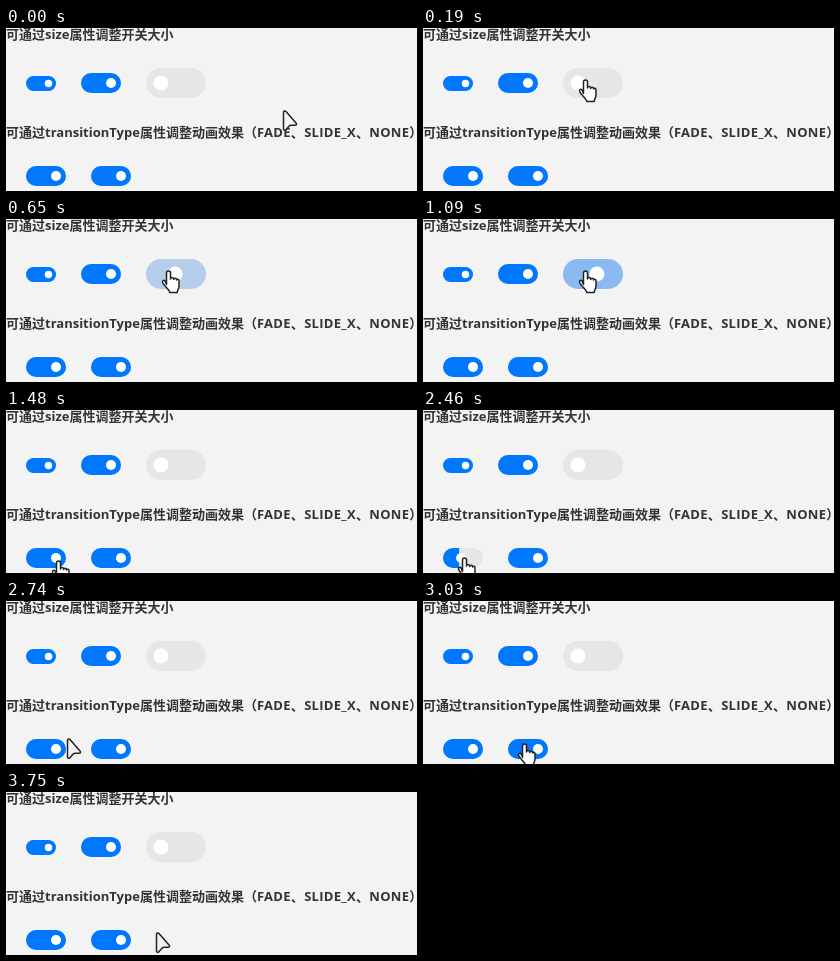
These frames come from a looping animation (411 px wide and 163 px high, 3790 ms). An HTML page:

```html
<!DOCTYPE html>
<html lang="zh">
<head>
<meta charset="utf-8">
<style>
html, body { margin: 0; width: 100%; height: 100%; overflow: hidden; background: #f3f3f3; }
svg { display: block; }
text { font: 700 13px "Open Sans", "Noto Sans CJK SC", "Noto Sans CJK", sans-serif; fill: #333; }
.caps { letter-spacing: .3px; }
#hand, #arrow { stroke: #222; stroke-width: 1.5; stroke-linejoin: round; fill: #fff; }
#arrow { fill: #f3f3f3; }
</style>
</head>
<body>
<svg width="411" height="163" viewBox="0 0 411 163">
  <text x="0" y="11">可通过size属性调整开关大小</text>
  <text x="0" y="109">可通过transitionType属性调整动画效果（<tspan class="caps">FADE、SLIDE_X、NONE</tspan>）</text>
  <g id="switches"></g>
  <path id="hand" d="M4.5 14.5V3a2 2 0 0 1 4 0V9c0-2 3.2-2 3.2.4c.2-1.6 2.9-1.4 2.9.6c.3-1.2 2.4-1 2.4.8V16c0 3-1.8 4-1.8 6.5H7.8c0-2-5-6-7-9.7c-1-2 1-3.2 2.3-1.8z"/>
  <path id="arrow" d="M1.5 2.5V19c0 1.5 1.5 1.8 2.4.7L7 16.2c.6-.7 1.3-1 2.2-1H13c1.6 0 2-1.2 1-2.2L4 1.5C3 .5 1.5 1 1.5 2.5z"/>
</svg>
<script>
const LOOP = 3790, BLUE = '#0077ff', GREY = '#e6e6e6';
const byId = id => document.getElementById(id);

function add(tag, attrs) {
  const el = document.createElementNS('http://www.w3.org/2000/svg', tag);
  for (const k in attrs) el.setAttribute(k, attrs[k]);
  return byId('switches').appendChild(el);
}

// mode: how the blue layer follows the knob
function makeSwitch(x, y, w, h, mode) {
  const box = { x, y, width: w, height: h, rx: h / 2 };
  add('rect', { ...box, fill: GREY });
  const blue = add('rect', { ...box, fill: BLUE });
  const knob = add('circle', { cy: y + h / 2, r: h / 4, fill: '#fff' });
  return p => {
    knob.setAttribute('cx', x + h / 2 + p * (w - h));
    if (mode === 'slide') blue.style.clipPath = `inset(0 ${(1 - p) * w}px 0 0)`;
    else blue.style.opacity = p * p;
  };
}

makeSwitch(20, 48, 30, 15)(1);
makeSwitch(75, 45, 40, 20)(1);
const large = makeSwitch(140, 40, 60, 30, 'fade');
const slide = makeSwitch(20, 138, 40, 20, 'slide');
const instant = makeSwitch(85, 138, 40, 20, 'fade');

// time, x, y, shape
const moves = [
  [0, 276, 82, 'arrow'], [50, 262, 80, 'arrow'], [100, 222, 67, 'arrow'],
  [140, 175, 53, 'hand'], [190, 156, 51, 'hand'],
  [1330, 130, 72, 'arrow'], [1380, 78, 120, 'arrow'], [1430, 48, 153, 'hand'],
  [1480, 46, 150, 'hand'], [1530, 41, 145, 'hand'], [1580, 37, 141, 'hand'],
  [1630, 35, 147, 'hand'],
  [2660, 42, 143, 'hand'], [2720, 60, 137, 'arrow'], [2790, 80, 136, 'hand'],
  [2840, 86, 132, 'hand'], [2890, 92, 136, 'hand'], [2930, 94, 140, 'hand'],
  [3030, 95, 142, 'hand'],
  [3700, 118, 133, 'arrow'], [3750, 149, 140, 'arrow']
];

const ramp = (t, start) => Math.min(1, Math.max(0, (t - start) / 300));

function draw(t) {
  large(ramp(t, 510) - ramp(t, 980));
  slide(1 - ramp(t, 1700) + ramp(t, 2340));
  instant(t >= 3230 && t < 3530 ? 0 : 1);
  const [, x, y, shape] = moves.findLast(m => m[0] <= t);
  for (const id of ['hand', 'arrow']) {
    byId(id).style.display = id === shape ? '' : 'none';
    byId(id).setAttribute('transform', `translate(${x} ${y})`);
  }
}

const begin = performance.now();
function tick() {
  draw((performance.now() - begin) % LOOP);
  requestAnimationFrame(tick);
}
tick();
</script>
</body>
</html>
```
